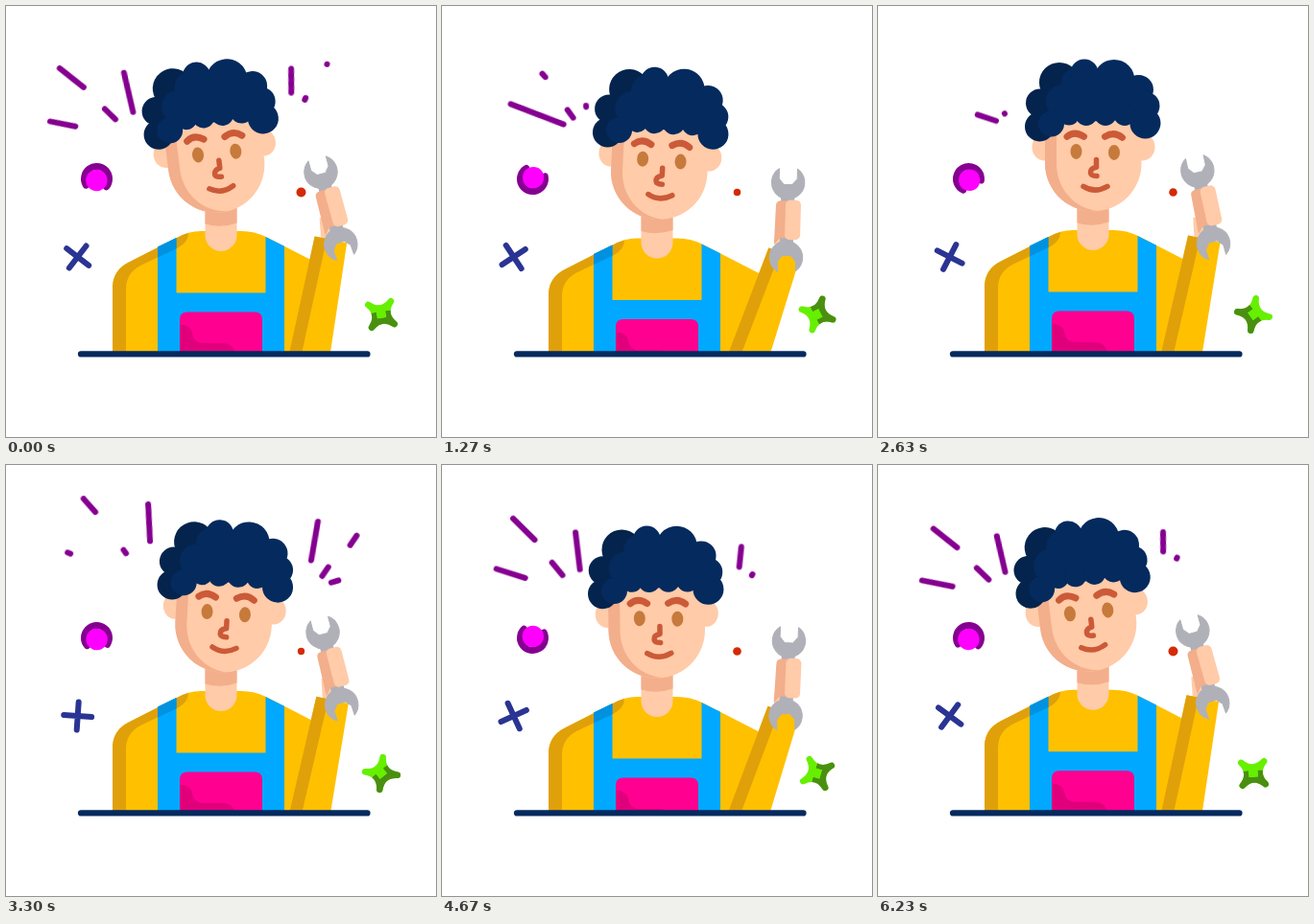
Write an HTML page without scripts that moves like this. It is 448 by 450 pixels and loops after 6.26 s.

```html
<!DOCTYPE html>
<html lang="en">
<head>
<meta charset="utf-8">
<title>Mechanic</title>
<style>
@property --head { syntax: "<number>"; inherits: false; initial-value: 0; }
@property --tail { syntax: "<number>"; inherits: false; initial-value: 0; }

html, body { margin: 0; width: 100%; height: 100%; overflow: hidden; background: #fff; }
svg { display: block; width: 100vw; height: 100vh; }

.swing { animation: 3130ms cubic-bezier(.37, 0, .63, 1) infinite; }
.bob { animation-name: bob; animation-delay: -407ms; }
.arm { animation-name: arm; animation-delay: -157ms; transform-origin: 300px 365px; }
.wrist { animation-name: wrist; animation-delay: -157ms; }
.grip { animation-name: grip; animation-delay: -63ms; }
.star { animation-name: star; animation-delay: -689ms; }
.ring { animation-name: ring; animation-delay: -63ms; }
.head { animation-name: head; animation-duration: 2086.667ms; animation-delay: -21ms; transform-origin: 224px 206px; }
.dot { animation-name: dot; animation-duration: 2086.667ms; animation-delay: -40ms; }
.cross { animation-name: cross; animation-duration: 6260ms; animation-delay: -1460ms; }

@keyframes bob { 0%, 100% { translate: 0 .3px; } 55% { translate: 0 9px; } }
@keyframes arm { 0%, 100% { rotate: -.4deg; } 47% { rotate: 8.5deg; } }
@keyframes wrist { 0%, 100% { translate: 0 0; } 47% { translate: 10px 6.5px; } }
@keyframes grip { 0%, 100% { rotate: -15.5deg; } 50% { rotate: 2.5deg; } }
@keyframes star { 0%, 100% { rotate: 63deg; } 54% { rotate: -130deg; } }
@keyframes ring { 0%, 100% { rotate: 95deg; } 52% { rotate: -80deg; } }
@keyframes head {
  0%, 100% { rotate: -7.1deg; animation-timing-function: cubic-bezier(.3, .1, .6, 1); }
  50% { rotate: 3.8deg; animation-timing-function: cubic-bezier(.42, 0, .7, .9); }
}
@keyframes dot { 0%, 100% { scale: 1; } 54% { scale: .72; } }
@keyframes cross {
  0%, 100% { rotate: -66deg; animation-timing-function: cubic-bezier(.35, 0, .4, 1); }
  41% { rotate: 16deg; }
}

/* each spark is a dash running from --tail to --head along its line */
.sparks line {
  stroke-dasharray: calc(max(0, var(--head) - var(--tail)) * 1px) 900px;
  stroke-dashoffset: calc(var(--tail) * -1px);
  animation: lead 1565ms infinite, trail 1565ms infinite;
  animation-timing-function: cubic-bezier(.37, 0, .63, 1);
  animation-delay: calc((var(--a) - 1) * 1565ms), calc((var(--b) - 1) * 1565ms);
}
@keyframes lead {
  0% { --head: 0; opacity: 1; }
  33%, 100% { --head: 100; }
  65% { opacity: 1; }
  65.01%, 100% { opacity: 0; }
}
@keyframes trail {
  0% { --tail: 0; }
  37% { --tail: 100; }
  37.01%, 60% { --tail: 300; }
  60.01%, 100% { --tail: 0; }
}
</style>
</head>
<body>
<svg viewBox="0 0 448 450" fill="none" stroke-linecap="round" stroke-linejoin="round">
  <defs>
    <clipPath id="desk"><path d="M0-20H448V363H0Z"/></clipPath>
    <clipPath id="shade"><path d="M-30-3H-5V4H5V-3H30V30H-30Z"/></clipPath>
    <path id="spike" d="M-12-12Q0-1 12-12Q1 0 12 12Q0 1-12 12Q-1 0-12-12Z" stroke-width="6.500"/>
    <path id="jaw" d="M-9.500-14.500A17.200 17.200 0 1 0 9.500-14.500V-4L4.500 2H-4.500L-9.500-4Z" stroke-width="1"/>
  </defs>

  <g clip-path="url(#desk)">
    <g class="swing bob">
      <!-- torso -->
      <path fill="#ffc000" d="M111 380V291Q112 274 128 266L178 240.500Q190 233.500 203 233.500H245Q259 233.500 271 239.500L335 272.600L316 380Z"/>
      <path fill="#e0a00a" d="M111 380V291Q112 274 128 266L178 240.500Q184 237 190 235.500Q190 245 179 251L141 269Q125 277 125 294V380Z"/>
      <path fill="#00a8ff" d="M158 250L177.500 240.500V298H270.500V239.500L290 249.300V380H158Z"/>
      <path fill="#0092de" d="M158 250L177.500 240.500V251.700L158 261Z"/>
      <path fill="#ff0090" d="M181 380V326Q181 318 189 318H259Q267 318 267 326V380Z"/>
      <path fill="#e0007c" d="M181 331Q193 332 194 340Q195 350 205 350.500H226Q238 351 239 363V380H181Z"/>
      <path fill="#ffcba8" d="M207.500 205H240.500V238A16.500 16.500 0 0 1 207.500 238Z"/>
      <path fill="#f3ae8b" d="M207.500 205H240.500V225Q224 231 207.500 226Z"/>

      <!-- arm -->
      <g class="swing arm">
        <path fill="#ffcba8" d="M327 220H340L344 250H329Z"/>
        <path fill="#ffc000" d="M322 239L355.500 246L335 380H291Z"/>
        <path fill="#e0a00a" d="M322 239L334.500 241.600L304 380H291Z"/>
      </g>
      <g transform="translate(348.500 247)">
        <g class="swing wrist"><g class="swing grip">
          <g fill="#b0b0b8" stroke="#b0b0b8">
            <path d="M-7-65H7V-10H-7Z" stroke="none"/>
            <use href="#jaw" y="-78"/>
            <use href="#jaw" transform="rotate(176)"/>
          </g>
          <path fill="#f3ae8b" d="M-12-54Q-12-59-6-59H2V-20H-7L-13-13Z"/>
          <rect fill="#ffcba8" x="-2" y="-60" width="16" height="41.500" rx="5"/>
        </g></g>
      </g>

      <g class="swing head">
        <!-- sparks, drawn from the inner end outwards -->
        <g class="sparks" stroke="#850090" stroke-width="6">
          <line pathLength="100" x1="101" y1="71" x2="71.500" y2="41" style="--a:.74;--b:.91"/>
          <line pathLength="100" x1="145" y1="100" x2="139" y2="43" style="--a:.78;--b:.965"/>
          <line pathLength="100" x1="132" y1="112" x2="116" y2="92" style="--a:.67;--b:.84"/>
          <line pathLength="100" x1="123" y1="119.500" x2="58" y2="98" style="--a:.56;--b:.79"/>
          <line pathLength="100" x1="311" y1="99" x2="317" y2="47" style="--a:.84;--b:.02"/>
          <line pathLength="100" x1="351.500" y1="74" x2="373" y2="38" style="--a:.99;--b:.17"/>
          <line pathLength="100" x1="324" y1="108" x2="334.500" y2="90.500" style="--a:.93;--b:.08"/>
          <line pathLength="100" x1="334" y1="114" x2="396" y2="92" style="--a:.035;--b:.23"/>
        </g>

        <!-- face -->
        <g fill="#ffcba8">
          <ellipse cx="173" cy="147" rx="12.500" ry="14"/>
          <ellipse cx="276" cy="147" rx="12.500" ry="14"/>
          <path d="M174 105H274.500V164A50.250 50 0 0 1 174 164Z"/>
        </g>
        <path fill="#f3ae8b" d="M174 105H186V164C186 190 204 211 230 213.700A50.250 50 0 0 1 174 164Z"/>

        <!-- hair -->
        <g fill="#04244d">
          <circle cx="189" cy="79.500" r="21"/>
          <circle cx="169" cy="101" r="15"/>
          <circle cx="168.500" cy="125.500" r="15.500"/>
        </g>
        <g fill="#052a5e">
          <ellipse cx="232" cy="95" rx="50" ry="25"/>
          <circle cx="207" cy="80" r="16"/>
          <circle cx="215" cy="69.500" r="14.500"/>
          <circle cx="246" cy="77" r="21.500"/>
          <circle cx="271.500" cy="87" r="15.500"/>
          <circle cx="278.500" cy="104" r="15"/>
          <circle cx="278.500" cy="122" r="16"/>
          <circle cx="192" cy="99" r="17"/>
          <circle cx="180.500" cy="122.500" r="13.500"/>
          <circle cx="199" cy="113" r="11"/>
          <circle cx="217" cy="113" r="11.500"/>
          <circle cx="237" cy="113" r="11.500"/>
          <circle cx="257" cy="113" r="11.500"/>
        </g>

        <g fill="#c67a3c">
          <ellipse cx="206.500" cy="151.500" rx="6" ry="8"/>
          <ellipse cx="246" cy="152.500" rx="6" ry="8"/>
        </g>
        <g stroke="#cb5a38" stroke-width="7">
          <path d="M197 136Q205 129.500 214.500 136"/>
          <path d="M236.500 136Q246 130 254.500 137"/>
          <path stroke-width="5.500" d="M227.500 160V168Q221 169 221.500 174Q222 177 228 177"/>
          <path stroke-width="5.500" d="M214 188Q226 195.500 239 188"/>
        </g>
      </g>
    </g>
  </g>

  <path stroke="#052a5e" stroke-width="6.200" d="M78 363.400H376.500"/>

  <g transform="translate(94.500 180.500)">
    <g class="swing ring">
      <path stroke="#850090" stroke-width="7" d="M7.500 10.600A13 13 0 1 1 7.500-10.600"/>
      <circle fill="#f0f" cx="1.500" r="11.200"/>
    </g>
  </g>

  <g transform="translate(74.700 262)">
    <g class="swing cross">
      <path transform="rotate(41)" stroke="#2a3493" stroke-width="6" d="M-14.500 0H14.500M0-14.500V14.500"/>
    </g>
  </g>

  <g transform="translate(391 322)">
    <g class="swing star"><g transform="rotate(-3)">
      <use href="#spike" fill="#66f000" stroke="#66f000"/>
      <g clip-path="url(#shade)"><use href="#spike" fill="#4a8f12" stroke="#4a8f12"/></g>
    </g></g>
  </g>

  <g transform="translate(307.500 194.500)"><circle class="swing dot" fill="#d42a05" r="5"/></g>
</svg>
</body>
</html>
```
